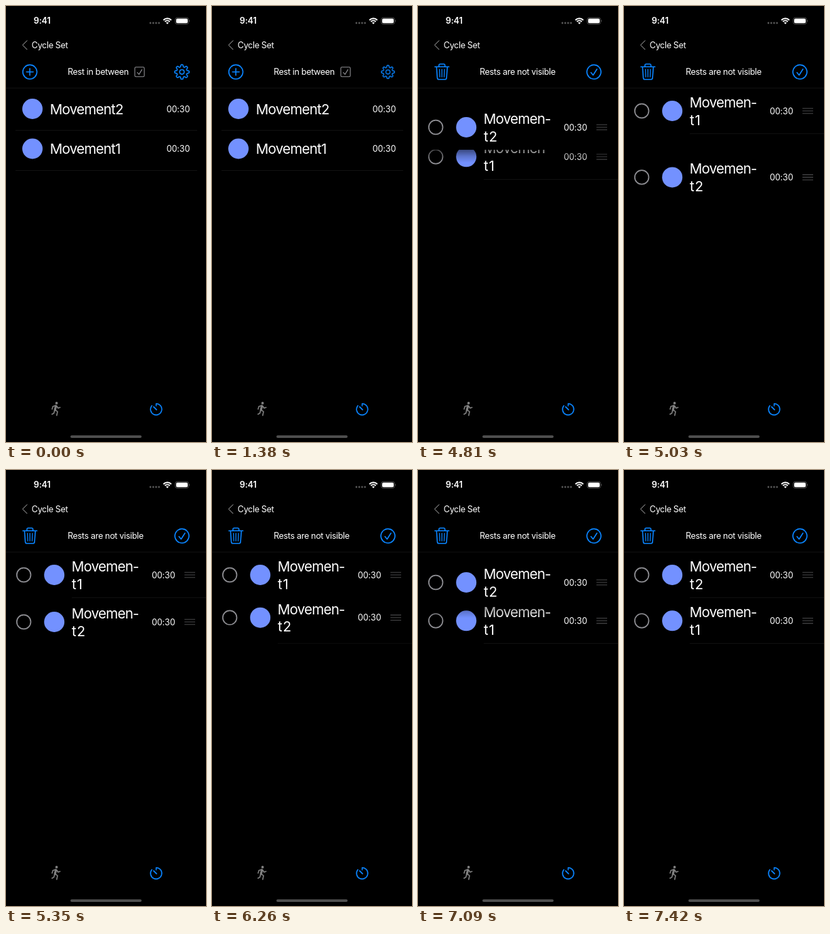
An HTML page that plays this animation: 295x640 px, repeating every 8 s.

```html
<!DOCTYPE html>
<html lang="en">
<head>
<meta charset="utf-8">
<title>Cycle Set</title>
<style>
html, body { margin: 0; width: 100%; height: 100%; overflow: hidden; background: #000; }
svg { display: block; width: 295px; height: 640px; }
text { font: 400 12.6px Inter, Roboto, sans-serif; letter-spacing: -.028em; fill: #fff; }
.name { font-size: 20.6px; letter-spacing: -.039em; }
.tail { font-size: 20.6px; letter-spacing: .04em; }
.time { letter-spacing: -.012em; }
.clock { font-size: 12.7px; font-weight: 600; letter-spacing: -.01em; }
.line { fill: none; stroke-linecap: round; stroke-linejoin: round; }
.blue { stroke: #0a84ff; stroke-width: 1.6; }
.gray { stroke: #8e8e93; stroke-width: 1.1; }
.sep { stroke: #111; stroke-width: 1; }
.ball { fill: #7391ff; }
.list, .edit, .gear, .first, .second, .lift, .rest { animation: 8s step-end infinite; }
.list { animation-name: list; }
.edit { animation-name: edit; }
.gear { animation-name: press; transform-origin: 259.5px 96.8px; }
.first { animation-name: first; }
.second { animation-name: second; }
.lift { animation-name: lift; }
.rest { animation-name: rest; }
@keyframes list { 0% { visibility: visible } 54.625%, 100% { visibility: hidden } }
@keyframes edit { 0% { visibility: hidden } 54.625%, 100% { visibility: visible } }
@keyframes press { 0% { transform: none } 17.25%, 100% { transform: scale(.9) } }
@keyframes second {
  0% { transform: translateY(154px) }
  57.5% { transform: translateY(160px) }
  58.875% { transform: translateY(178px) }
  60.25% { transform: translateY(204px) }
  61.5% { transform: translateY(234px) }
  62.875% { transform: translateY(251.4px) }
  64.25% { transform: translateY(246px) }
  65.5% { transform: translateY(232px) }
  66.875% { transform: translateY(223px) }
  68.25% { transform: translateY(221.3px) }
  78.25% { transform: translateY(216.7px) }
  79.625% { transform: translateY(207px) }
  81% { transform: translateY(192px) }
  82.5% { transform: translateY(177px) }
  84.25% { transform: translateY(170px) }
  85.5% { transform: translateY(169px) }
  87.375% { transform: translateY(165px) }
  88.75% { transform: translateY(160px) }
  90% { transform: translateY(157px) }
  91.375% { transform: translateY(155px) }
  92.75%, 100% { transform: translateY(154px) }
}
@keyframes first {
  0% { transform: translateY(221.3px) }
  60.25% { transform: translateY(196px) }
  61.5% { transform: translateY(163px) }
  62.875% { transform: translateY(154px) }
  81% { transform: translateY(171px) }
  82.5% { transform: translateY(209px) }
  84.25%, 100% { transform: translateY(221.3px) }
}
@keyframes lift {
  0% { opacity: 0 }
  57.5% { opacity: 1 }
  65.5% { opacity: .5 }
  66.875% { opacity: 0 }
  78.25% { opacity: 1 }
  88.75% { opacity: .7 }
  90% { opacity: .4 }
  91.375% { opacity: .15 }
  92.75%, 100% { opacity: 0 }
}
@keyframes rest {
  0% { opacity: 1 }
  57.5% { opacity: 0 }
  68.25% { opacity: 1 }
  78.25% { opacity: 0 }
  92.75%, 100% { opacity: 1 }
}
</style>
</head>
<body>
<svg viewBox="0 0 295 640">
  <defs>
    <linearGradient id="below" x1="0" y1="0" x2="0" y2="1">
      <stop offset="0" stop-opacity=".5"/>
      <stop offset=".5" stop-opacity=".2"/>
      <stop offset="1" stop-opacity="0"/>
    </linearGradient>
    <linearGradient id="above" x1="0" y1="1" x2="0" y2="0">
      <stop offset="0" stop-opacity=".4"/>
      <stop offset="1" stop-opacity="0"/>
    </linearGradient>
    <g id="cell">
      <circle class="line" cx="26.2" r="10.3" stroke="#8e8e93" stroke-width="1.7"/>
      <circle class="ball" cx="71.2" r="15"/>
      <text class="name" x="96.8" y="-5">Movemen-</text>
      <text class="time" x="215" y="4.6">00:30</text>
      <path d="M263.2-3.8h15.8M263.2 0h15.8M263.2 3.8h15.8" stroke="#48484a" stroke-width="1.1"/>
    </g>
  </defs>
  <rect width="295" height="640"/>

  <text class="clock" x="40.7" y="26.3">9:41</text>
  <g fill="#555">
    <circle cx="213" cy="25" r="1.4"/><circle cx="217.2" cy="25" r="1.4"/>
    <circle cx="221.4" cy="25" r="1.4"/><circle cx="225.6" cy="25" r="1.4"/>
  </g>
  <g class="line" stroke="#fff" stroke-width="2" style="stroke-linecap:butt">
    <path d="M232.2 20.7a8.2 8.2 0 0 1 11.6 0M234.4 23a5.2 5.2 0 0 1 7.2 0"/>
  </g>
  <path d="M238 26.7l-2-2.1a2.9 2.9 0 0 1 4 0z" fill="#fff"/>
  <rect x="249.7" y="17.2" width="19.6" height="9.4" rx="2.8" fill="none" stroke="#666" stroke-width=".8"/>
  <rect x="251" y="18.5" width="17" height="6.8" rx="1.7" fill="#fff"/>
  <path d="M270.4 20.3q1.4 1.6 0 3.2z" fill="#777"/>

  <path class="line" d="M31 50.8l-6.5 6.5 6.5 6.5" stroke="#b0b0b0" stroke-width="1"/>
  <text x="37.8" y="61.7">Cycle Set</text>
  <path class="sep" d="M0 120.5H295"/>

  <g class="list">
    <g class="line blue">
      <circle cx="35.2" cy="96.8" r="10.4"/>
      <path d="M30.2 96.8h10M35.2 91.8v10"/>
      <g class="gear"><path id="teeth"/><circle cx="259.5" cy="96.8" r="3.3"/></g>
    </g>
    <text x="91" y="101.4">Rest in between</text>
    <g class="line gray">
      <rect x="190" y="89.8" width="14" height="14" rx="1.6"/>
      <path d="M193.7 97.6l2.5 2.8 4.3-7"/>
    </g>
    <circle class="ball" cx="39" cy="151" r="15"/>
    <text class="name" x="64.8" y="158.7">Movement2</text>
    <text class="time" x="236.7" y="155.8">00:30</text>
    <circle class="ball" cx="39" cy="209.5" r="15"/>
    <text class="name" x="64.8" y="217.2">Movement1</text>
    <text class="time" x="236.7" y="214.3">00:30</text>
    <path class="sep" d="M14 182.5H282M14 241.5H282"/>
  </g>

  <g class="edit">
    <g class="line blue">
      <path d="M24.9 89.2h20.8M30.9 88.8v-1.8q0-1.7 1.7-1.7h5.4q1.7 0 1.7 1.7v1.8M27.3 89.4l1.2 16.2q.2 2.1 2.2 2.1h9.2q2 0 2.2-2.1l1.2-16.2"/>
      <path d="M31.6 92.8l.5 11.4M35.3 92.8v11.4M39 92.8l-.5 11.4" stroke-width="1.3"/>
      <circle cx="259.5" cy="96.8" r="10.4"/>
      <path d="M255.2 97.7l3.1 3.8 5.6-8.8"/>
    </g>
    <text x="91" y="101.4">Rests are not visible</text>
    <path class="sep" d="M97 254.5H295"/>
    <g class="first">
      <use href="#cell"/>
      <text class="tail" x="97" y="20.6">t1</text>
      <path class="sep" d="M97 33.4H295"/>
    </g>
    <g class="second">
      <g class="lift">
        <rect y="33" width="295" height="19" fill="url(#below)"/>
        <rect y="-47" width="295" height="14" fill="url(#above)"/>
      </g>
      <rect y="-33" width="295" height="66"/>
      <use href="#cell"/>
      <text class="tail" x="97" y="20.6">t2</text>
      <path class="sep rest" d="M97 33.4H295"/>
    </g>
  </g>

  <g class="line" stroke="#808080" stroke-width="1.6">
    <circle cx="74.6" cy="582.9" r="1.9" fill="#808080" stroke="none"/>
    <path d="M73.6 587.2l-1.4 6" stroke-width="3.2"/>
    <path d="M73.4 586.5l-4.2 1.2-1.2 4M74.6 587l2.2 3.2 2.9-.9M73 593l3 2.6-1.2 5.4M71.6 594l-1 3.8-2.8 1.4"/>
  </g>
  <g class="line blue">
    <path d="M221.5 587v-3.3a8.3 8.3 0 1 1-6.4 3"/>
    <path d="M222 592.6l-4.2-4.2" stroke-width="1.9"/>
  </g>
  <rect x="95" y="630.2" width="105" height="3.8" rx="1.9" fill="#505050"/>
</svg>
<script>
// Eight rounded teeth around the centre of the gear
const points = [];
for (let i = 0; i < 160; i++) {
  const a = i / 160 * Math.PI * 2;
  const r = 9.2 + 1.5 * Math.tanh(2.2 * Math.cos(8 * a));
  points.push((259.5 + r * Math.sin(a)).toFixed(2) + ' ' + (96.8 - r * Math.cos(a)).toFixed(2));
}
document.getElementById('teeth').setAttribute('d', 'M' + points.join('L') + 'Z');
</script>
</body>
</html>
```
